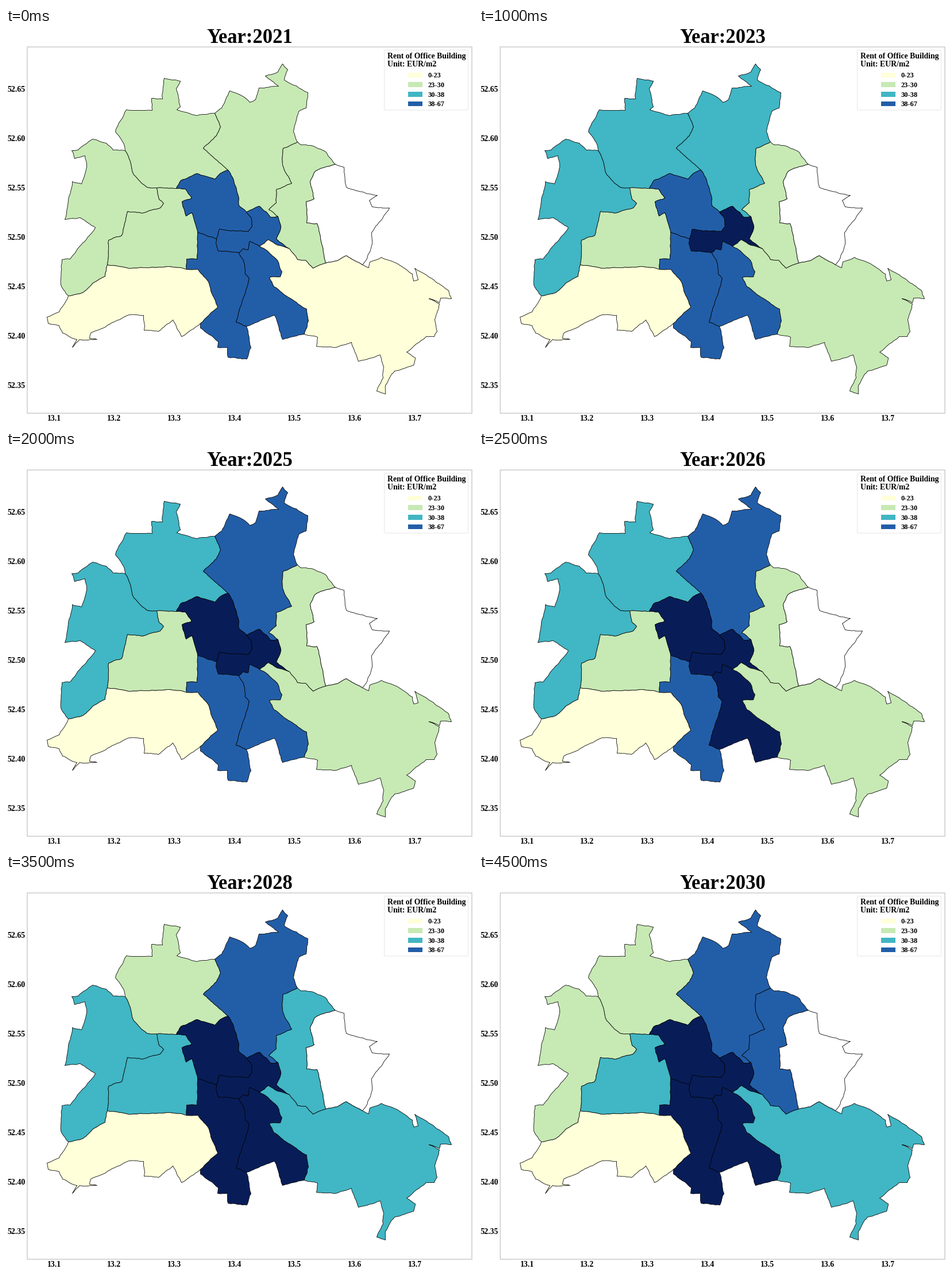
Animation of 813x688 px, one loop 5000 ms. Source, as a matplotlib script:

```python
import numpy as np
import matplotlib.pyplot as plt
from matplotlib.animation import FuncAnimation
from matplotlib.collections import PolyCollection
from matplotlib.patches import FancyBboxPatch, Rectangle

W, H, DPI = 813, 688, 64
PT = 72 / DPI  # points per pixel
FIRST_YEAR, YEARS = 2021, 10
LOW, MID, HIGH, TOP, PEAK = COLORS = [
    "#ffffd9", "#c7e9b4", "#41b6c4", "#225ea8", "#081d58"]

rng = np.random.default_rng(12)


def roughen(a, b, step=6):
    """Points from a towards b with a ragged midpoint displacement."""
    d = b - a
    size = np.hypot(*d)
    if size < step:
        return [a]
    shift = rng.uniform(-1, 1) * min(0.07 * size, 0.9) / size
    mid = (a + b) / 2 + shift * np.array([-d[1], d[0]])
    return roughen(a, mid, step) + roughen(mid, b, step)


def border(*keys):
    pts = [np.array(k, float) + 0.5 for k in keys]
    line = [p for a, b in zip(pts, pts[1:]) for p in roughen(a, b)]
    return np.array(line + [pts[-1]])


def ring(*lines):
    """Chain borders into one outline, flipping those that run backwards."""
    first, second = lines[:2]
    joins = (second[0], second[-1])
    if not any(np.array_equal(first[-1], j) for j in joins):
        first = first[::-1]
    chain = [first]
    for line in lines[1:]:
        forward = np.array_equal(chain[-1][-1], line[0])
        chain.append(line if forward else line[::-1])
    return np.concatenate(chain)


# Points where three borders, or a border and the city limit, meet
A, B, C, D, E = (207, 213), (363, 148), (507, 198), (573, 237), (620, 412)
F, G, I, J, K = (519, 533), (418, 519), (338, 514), (108, 466), (262, 278)
L, M, N, P, Q = (296, 279), (386, 247), (418, 320), (473, 328), (493, 384)
R, S, T, U, V = (556, 409), (176, 412), (314, 420), (333, 355), (366, 367)
X, Y = (405, 391), (441, 380)

# City limit, clockwise from the west
limit_w = border(
    J, (104, 462), (95, 447), (97, 403), (111, 402), (155, 347), (129, 330),
    (102, 333), (115, 267), (131, 271), (140, 242), (137, 222), (119, 227),
    (114, 213), (125, 212), (138, 202), (151, 193), (174, 200), (186, 212), A)
limit_nw = border(
    A, (205, 202), (190, 180), (209, 142), (254, 143), (253, 122), (272, 123),
    (275, 87), (303, 92), (296, 105), (303, 137), (297, 142), (332, 152), B)
limit_n = border(
    B, (375, 139), (389, 109), (411, 118), (424, 129), (434, 124), (440, 104),
    (474, 101), (451, 83), (473, 76), (481, 62), (490, 72), (484, 90),
    (525, 112), (522, 139), (509, 145), (500, 180), C)
limit_ne = border(C, (513, 203), (529, 204), (557, 216), D)
limit_e = border(
    D, (588, 242), (592, 277), (646, 291), (632, 300), (637, 311), (667, 313),
    (657, 327), (636, 356), (637, 376), (627, 403), E)
limit_se = border(
    E, (631, 417), (633, 407), (653, 399), (684, 412), (707, 428), (709, 440),
    (717, 438), (711, 418), (744, 438), (770, 457), (775, 471), (756, 470),
    (754, 478), (736, 471), (754, 480), (746, 507), (750, 528), (745, 537),
    (731, 537), (697, 564), (712, 574), (709, 587), (676, 597), (660, 622),
    (660, 637), (645, 632), (656, 609), (657, 590), (651, 569), (613, 580),
    (601, 547), (571, 556), (540, 554), (542, 538), F)
limit_s = border(F, (481, 542), (467, 500), G)
limit_sc = border(G, (426, 556), (419, 576), (386, 573), (385, 556), (368, 556),
                  (369, 546), (338, 522), I)
limit_sw = border(
    I, (305, 537), (290, 508), (265, 528), (240, 526), (239, 500), (214, 499),
    (147, 531), (145, 540), (158, 542), (128, 542), (115, 556), (123, 542),
    (98, 531), (92, 518), (73, 514), (71, 503), (92, 494), (104, 475), J)

# Borders between districts
w_sw = border(J, (134, 460), (152, 443), (172, 432), S)
w_mid = border(S, (178, 369), (201, 361), (211, 319), (237, 322), (268, 313),
               (274, 305), (266, 298), K)
w_nw = border(A, (216, 232), (222, 255), (245, 277), K)
nw_mid = border(K, L)
nw_n = border(B, (373, 172), (366, 187), (343, 209), M)
nw_mi = border(L, (304, 265), (332, 253), (363, 263), (376, 251), M)
n_mi = border(M, (394, 260), (404, 292), (405, 309), N)
n_in = border(N, (441, 310), (453, 320), (460, 329), P)
n_ne = border(C, (482, 209), (481, 238), (497, 270), (470, 281), (470, 304),
              (457, 316), P)
ne_e = border(D, (552, 243), (537, 250), (529, 267), (536, 297), (522, 302),
              (523, 339), (541, 340), (549, 375), R)
ne_in = border(P, (478, 347), (470, 367), Q)
ne_se = border(Q, (507, 403), (521, 404), (534, 418), R)
e_se = border(R, (576, 405), (592, 396), E)
in_se = border(Q, (473, 378), (456, 368), Y)
s_se = border(Y, (455, 388), (472, 404), (480, 424), (477, 433), (458, 434),
              (466, 450), (523, 489), (526, 510), F)
in_s = border(X, (412, 384), (421, 386), (424, 371), Y)
sc_s = border(X, (413, 404), (416, 428), (423, 436), (404, 496), (400, 512), G)
mi_mid = border(L, (312, 280), (323, 296), (306, 302), (313, 327), (323, 321),
                (329, 340), U)
mi_sc = border(U, V)
mi_in = border(V, (371, 350), (421, 354), (428, 345), (426, 329), N)
in_sc = border(V, (365, 375), (369, 388), X)
mid_sc = border(U, (332, 402), (314, 402), T)
mid_sw = border(S, (218, 418), (283, 415), T)
sw_sc = border(T, (334, 420), (350, 439), (368, 486), I)

# Each district: the years its price class changes, then its borders
DISTRICTS = [
    ({2021: MID, 2022: TOP, 2023: HIGH, 2029: MID}, ring(limit_w, w_nw, w_mid, w_sw)),
    ({2021: MID, 2023: HIGH, 2028: MID}, ring(limit_nw, nw_n, nw_mi, nw_mid, w_nw)),
    ({2021: MID, 2022: HIGH, 2025: TOP}, ring(limit_n, n_ne, n_in, n_mi, nw_n)),
    ({2021: MID, 2022: LOW, 2023: MID, 2027: HIGH, 2030: TOP},
     ring(limit_ne, ne_e, ne_se, ne_in, n_ne)),
    ({2021: "white"}, ring(limit_e, e_se, ne_e)),
    ({2021: MID, 2027: HIGH}, ring(w_mid, nw_mid, mi_mid, mid_sc, mid_sw)),
    ({2021: TOP, 2024: PEAK}, ring(nw_mi, n_mi, mi_in, mi_sc, mi_mid)),
    ({2021: TOP, 2022: PEAK}, ring(mi_in, n_in, ne_in, in_se, in_s, in_sc)),
    ({2021: TOP, 2027: PEAK}, ring(mi_sc, in_sc, sc_s, limit_sc, sw_sc, mid_sc)),
    ({2021: TOP, 2026: PEAK}, ring(in_s, s_se, limit_s, sc_s)),
    ({2021: LOW, 2023: MID, 2027: LOW, 2028: HIGH},
     ring(limit_se, s_se, in_se, ne_se, e_se)),
    ({2021: LOW}, ring(limit_sw, w_sw, mid_sw, sw_sc)),
]


def color_in(changes, year):
    return changes[max(y for y in changes if y <= year)]


plt.rcParams["font.family"] = "Liberation Serif"
plt.rcParams["font.weight"] = "bold"

fig = plt.figure(figsize=(W / DPI, H / DPI), dpi=DPI, facecolor="white")
ax = fig.add_axes([0, 0, 1, 1])
ax.set_xlim(0, W)
ax.set_ylim(H, 0)
ax.axis("off")


def label(x, y, text, px=13.89, ha="left"):
    return ax.text(x, y, text, fontsize=px * PT, ha=ha, va="baseline")


ax.add_patch(Rectangle((37, 32.5), 774.3, 638, fill=False, ec="#cccccc", lw=1.5 * PT))

shapes = PolyCollection([outline for _, outline in DISTRICTS], edgecolors="black",
                        linewidths=0.8 * PT, joinstyle="round")
ax.add_collection(shapes, autolim=False)

for i in range(7):
    label(83.8 + 104.65 * i, 684, f"{13.1 + 0.1 * i:.1f}", ha="center")
    label(34, 111 + 86 * i, f"{52.65 - 0.05 * i:.2f}", ha="right")

ax.add_patch(FancyBboxPatch((660.5, 40.5), 142, 100.5, fc="white", ec="#e6e6e6",
                            boxstyle="round,pad=2,rounding_size=2.5", lw=PT))
label(663.5, 53.5, "Rent of Office Building", 13.7)
label(663.5, 67, "Unit: EUR/m2", 13.7)
for i, name in enumerate(["0-23", "23-30", "30-38", "38-67"]):
    y = 77.5 + 16.7 * i
    ax.add_patch(Rectangle((700, y), 25, 8.75, fc=COLORS[i], lw=0))
    label(734.5, y + 8.8, name, 12.4)

title = label(424, 25.5, "", 34.5, "center")


def update(i):
    year = FIRST_YEAR + i
    title.set_text(f"Year:{year}")
    shapes.set_facecolor([color_in(changes, year) for changes, _ in DISTRICTS])
    return title, shapes


anim = FuncAnimation(fig, update, frames=YEARS, interval=500, repeat=True,
                     repeat_delay=0, blit=False)
plt.show()
```
